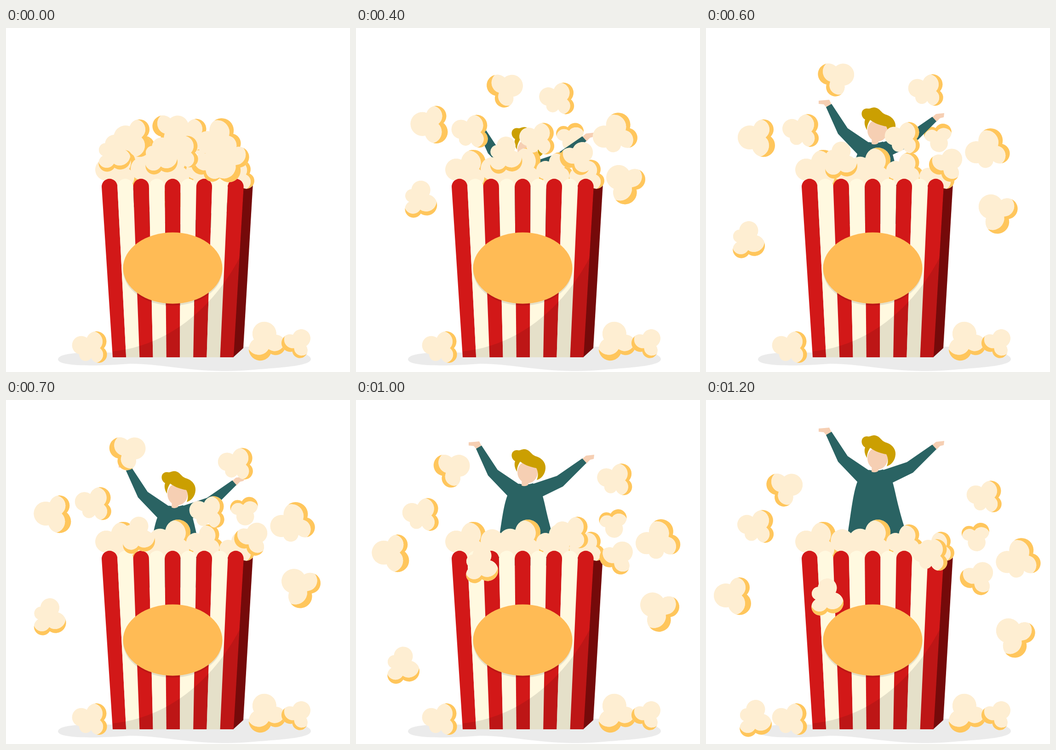
An HTML page with a canvas that plays this animation: 748x748 px, repeating every 2200 ms.

```html
<!DOCTYPE html>
<html lang="en">
<head>
<meta charset="utf-8">
<title>Popcorn surprise</title>
<style>
html, body { margin: 0; width: 100%; height: 100%; overflow: hidden; background: #fff; }
canvas { display: block; width: 748px; height: 748px; }
</style>
</head>
<body>
<canvas id="stage" width="748" height="748"></canvas>
<script>
const ctx = document.getElementById('stage').getContext('2d');
const CREAM = '#feeed2', YELLOW = '#ffc65c', RED = '#d21818', STRIPE = '#fff9e0';
const DARK = '#750a0a', TEAL = '#2a6363', SKIN = '#f6cfb3', HAIR = '#cb9f01';
const SHADE = 'rgba(0,0,0,.1)';
const LOOP = 2200, STEP = 100, END = 1200, CREST = 600;
const RAD = Math.PI / 180;

// Kernels are lobes around a core, lit from their +x side; rim is the width of the yellow edge.
const lobe = (angle, dist, r, rim = 0) =>
  ({ x: dist * Math.cos(angle * RAD), y: dist * Math.sin(angle * RAD), r, rim });
const trio = [lobe(0, 20, 26), lobe(-120, 20, 25, 13), lobe(120, 20, 22, 9), lobe(0, 0, 15)];
const clover = [lobe(15, 20, 20), lobe(135, 19, 22, 8.5), lobe(219, 24, 18, 8.5), lobe(303, 18, 14), lobe(0, 0, 16)];

function fill(path, color) {
  ctx.fillStyle = color;
  ctx.fill(new Path2D(path));
}

function ellipse(x, y, rx, ry, color) {
  ctx.fillStyle = color;
  ctx.beginPath();
  ctx.ellipse(x, y, rx, ry, 0, 0, 7);
  ctx.fill();
}

const disc = (x, y, r, color) => ellipse(x, y, r, r, color);

function insideLobe({ x, y, r }, paint) {
  ctx.save();
  ctx.beginPath();
  ctx.arc(x, y, r, 0, 7);
  ctx.clip();
  paint();
  ctx.restore();
}

function drawRim(part) {
  const { x, y, r, rim } = part;
  insideLobe(part, () => {
    ctx.beginPath();
    ctx.rect(x - 2 * r, y - 2 * r, 4 * r, 4 * r);
    ctx.moveTo(x + rim + r, y);
    ctx.arc(x + rim, y, r, 0, 2 * Math.PI);
    ctx.fillStyle = YELLOW;
    ctx.fill('evenodd');
  });
}

// Lit faces go on last, so that rims remain only on the outer edge.
function drawKernel(lobes, x, y, turn, scale = 1) {
  ctx.save();
  ctx.translate(x, y);
  ctx.rotate(turn * RAD);
  ctx.scale(scale, scale);
  lobes.forEach(p => disc(p.x, p.y, p.r, CREAM));
  lobes.filter(p => p.rim).forEach(drawRim);
  lobes.forEach(p => insideLobe(p, () => disc(p.x + p.rim, p.y, p.r, CREAM)));
  ctx.restore();
}

const mix = (a, b, p) => a + (b - a) * p;

// Thrown in an arc to the crest, later and flatter for short throws, then falling with gravity.
function flight(start, crest, end, t) {
  const reach = Math.abs(crest[0] - start[0]);
  if (t <= CREST) {
    const p = t / CREST, hop = 0.2 * reach * 4 * p * (1 - p);
    return [mix(start[0], crest[0], p ** (145 / reach)), mix(start[1], crest[1], p) - hop];
  }
  const p = (t - CREST) / (END - CREST);
  return [mix(crest[0], end[0], p), mix(crest[1], end[1], p ** 1.7)];
}

const flyer = (lobes, turn, scale, ...points) =>
  t => drawKernel(lobes, ...flight(...points, t), turn, scale);

const behindMan = flyer(trio, 80, 0.74, [439, 266], [504, 236], [586, 295]);
const besideMan = flyer(clover, 180, 1.04, [286, 271], [207, 224], [109, 276]);
const inFront = [
  flyer(trio, -28, 0.92, [357, 223], [282, 110], [170, 193]),
  flyer(clover, 180, 1, [400, 233], [479, 136], [606, 211]),
  flyer(clover, 155, 1.2, [461, 244], [611, 266], [678, 348]),
  flyer(trio, 180, 1, [280, 238], [115, 238], [63, 425]),
  flyer(trio, -53, 0.87, [442, 299], [524, 299], [591, 389]),
  flyer(trio, -143, 1.03, [487, 289], [636, 401], [674, 514]),
  flyer(clover, -97, 1.03, [233, 273], [90, 461], [105, 693]),
  flyer(clover, 180, 1, [381, 270], [428, 240], [488, 338]),
  flyer(clover, -97, 1.03, [335, 279], [291, 288], [261, 429])
];

function drawMan(t) {
  const left = (END - t) / STEP;
  ctx.save();
  ctx.translate(0, 15 * left + left ** 4 / 220);
  fill('M245 62L257 61 268 60 273 70 262 77 256 70 245 69Z', SKIN);
  fill('M492 98L500 91 518 89 517 98 509 100 501 108Z', SKIN);
  fill('M261 76L273 69 308 122 354 153 331 180 287 134Z', TEAL);
  fill('M492 97L501 107 450 158 405 180 383 153 437 135Z', TEAL);
  fill('M329 178L354 152Q370 156 385 151L406 179C412 200 415 222 430 272L440 330H302L309 285C316 240 320 202 329 178Z', TEAL);
  fill('M361 138L377 145 374 155Q367 159 360 156Z', SKIN);
  ellipse(373, 127, 22, 24, SKIN);
  fill('M350 126C344 116 344 108 346 103C335 97 336 79 350 79C357 81 360 76 368 77C380 80 380 88 390 92C408 97 413 110 412 119C411 132 403 141 393 144C397 135 396 125 392 118C380 116 368 112 357 104C353 110 350 117 350 126Z', HAIR);
  ctx.restore();
}

function drawHeap() {
  fill('M215 320H505V341H215Z', CREAM);
  drawKernel(clover, 242, 310, 170, 1.2);
  disc(296, 306, 25, CREAM);
  drawKernel(clover, 360, 307, 170, 1.25);
  drawKernel(clover, 432, 309, 165);
  drawKernel(clover, 502, 323, 165, 0.95);
}

function drawBoxFront() {
  for (let i = 0; i < 9; i++) {
    const left = 208 + 34.3 * i, right = left + 34.3;
    const footLeft = 232 + 29.2 * i, footRight = footLeft + 29.2;
    fill(`M${left} 345A17.15 17.15 0 0 1 ${right} 345L${footRight} 716H${footLeft}Z`, i % 2 ? STRIPE : RED);
  }
  fill('M232 703C350 692 450 610 507.5 500L494.8 716H232Z', SHADE);
  ellipse(362.5, 526, 108, 77.5, SHADE);
  ellipse(362.5, 522, 108, 77.5, '#ffbb55');
}

function drawGround() {
  fill('M113 720C116 708 150 704 235 706L516 693C600 692 663 705 663 720C662 735 600 738 540 743C420 754 350 730 270 730C190 736 112 736 113 720Z', '#ebebeb');
  drawKernel(clover, 183, 695, 180);
  drawKernel(trio, 567, 684, -105);
  drawKernel(trio, 633, 687, -53, 0.76);
}

function draw(t) {
  ctx.fillStyle = '#fff';
  ctx.fillRect(0, 0, 748, 748);
  drawGround();
  fill('M440 340L470 311 478 312 537 338 517 350Z', DARK);
  behindMan(t);
  drawMan(t);
  besideMan(t);
  fill('M516 345L537 337 516 696 494 716Z', DARK);
  drawHeap();
  drawBoxFront();
  inFront.forEach(show => show(t));
}

function tick() {
  const t = performance.now() % LOOP;
  draw(Math.min(Math.floor(t / STEP) * STEP, END));
  requestAnimationFrame(tick);
}
tick();
</script>
</body>
</html>
```
